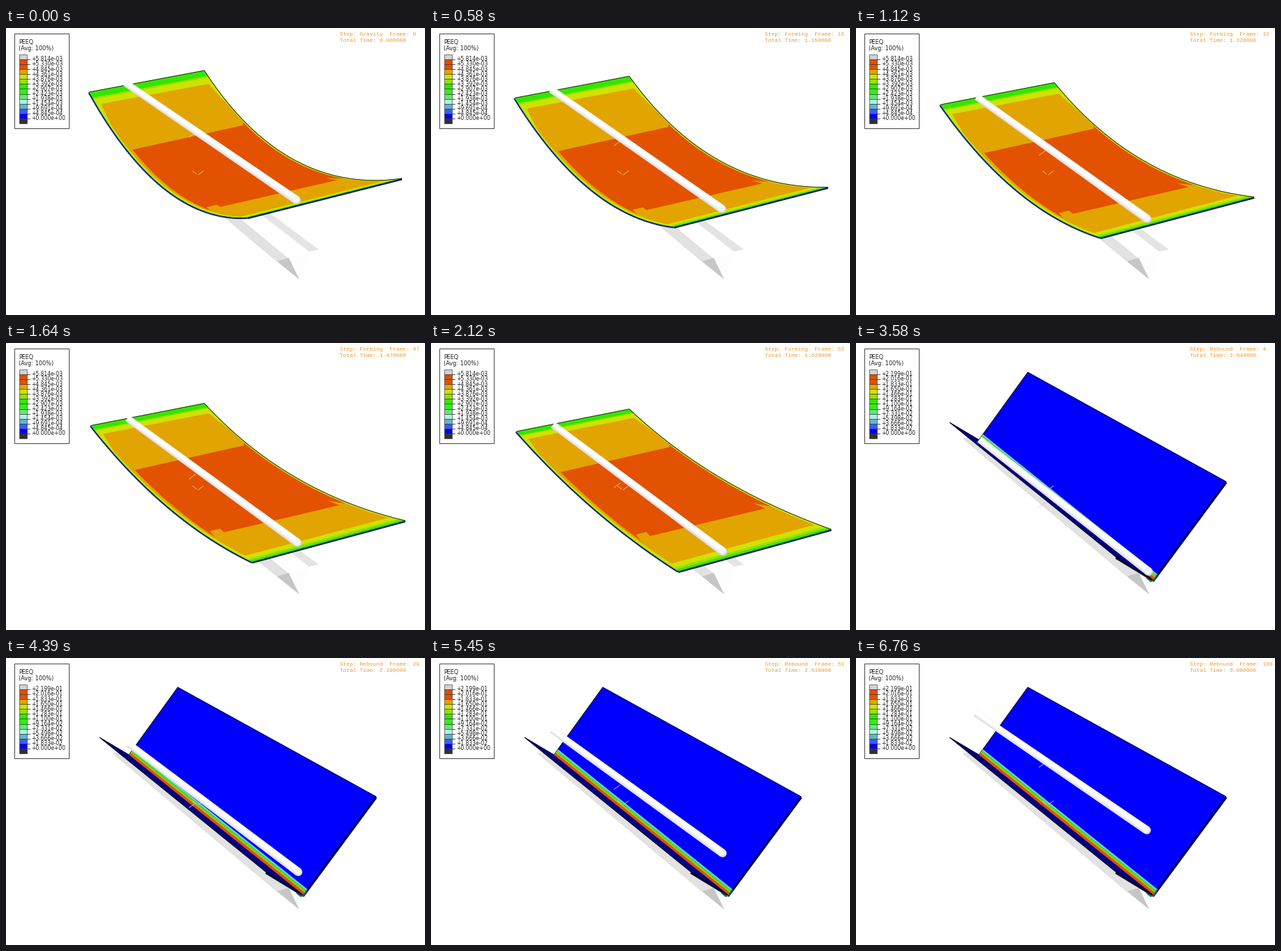
Animation of 600x412 px, one loop 6790 ms. Source, as a matplotlib script:

```python
import numpy as np
import matplotlib.pyplot as plt
from matplotlib.animation import FuncAnimation
from matplotlib.patches import Circle, Polygon, Rectangle

W, H, DPI = 600, 412, 100
PX = 72 / DPI
STEP_MS, COUNT = 35, 194
CONTACT = 83          # increment at which the fold starts
PEEQ_START = 0.00581445

# contour colours, lowest to highest
BINS = ["#0000ff", "#3c5cff", "#62b4cc", "#b0f0e0", "#62e878", "#30f014",
        "#34e600", "#98e000", "#cfe200", "#e2a400", "#e25200", "#dc5000"]

fig = plt.figure(figsize=(W / DPI, H / DPI), dpi=DPI, facecolor="white")
ax = fig.add_axes([0, 0, 1, 1])
ax.set_xlim(0, W)
ax.set_ylim(H, 0)
ax.axis("off")

moving = []


def poly(pts, color, z, edge="none", lw=0.0, keep=False):
    p = ax.add_patch(Polygon(pts, closed=True, facecolor=color, edgecolor=edge,
                             linewidth=lw * PX, zorder=z))
    if not keep:
        moving.append(p)


def line(pts, color, lw, z, style="-", alpha=1):
    pts = np.asarray(pts)
    moving.extend(ax.plot(pts[:, 0], pts[:, 1], color=color, lw=lw * PX, ls=style,
                          alpha=alpha, zorder=z, solid_capstyle="butt"))


def label(x, y, s, size, font, color="#202020"):
    return ax.text(x, y, s, fontsize=size * PX, family=font, color=color,
                   va="baseline", ha="left", zorder=20)


def shade(value, top, dim=1.0):
    n = min(int(value / top * 12), 11)
    rgb = [int(BINS[n][k:k + 2], 16) / 255 for k in (1, 3, 5)]
    return tuple(dim * c for c in rgb)


def unit(v):
    return v / np.hypot(*v)


# ---------- still parts ----------
def draw_die():
    poly([(405, 331), (434, 321), (420, 361)], "#fdfdfd", 1, keep=True)
    poly([(153, 137), (168, 136), (404, 331), (388, 335)], "#e2e2e2", 1,
         "#d2d2d2", 0.5, keep=True)
    poly([(388, 335), (405, 330), (420, 361)], "#c6c6c6", 1, keep=True)
    poly([(303, 219), (315, 219), (448, 318), (434, 321)], "#e4e4e4", 1, keep=True)


def draw_legend():
    ax.add_patch(Rectangle((11.5, 8), 78.5, 136, facecolor="white",
                           edgecolor="#484848", linewidth=PX, zorder=15))
    label(18, 23, "PEEQ", 8.2, "DejaVu Sans")
    label(18, 32, "(Avg: 100%)", 8.2, "DejaVu Sans")
    h = 7.07
    for k, c in enumerate(["#d2d2d2"] + BINS[::-1] + ["#303030"]):
        ax.add_patch(Rectangle((19, 38 + k * h), 11, h, facecolor=c,
                               edgecolor="#303030", linewidth=0.6 * PX, zorder=16))
    rows = []
    for k in range(13):
        y = 38 + (k + 1) * h
        ax.plot([30, 34], [y, y], color="#303030", lw=0.8 * PX, zorder=16)
        rows.append(label(36.3, y + 2.3, "", 7.6, "DejaVu Sans"))
    return rows


draw_die()
rows = draw_legend()
step_text = label(478.5, 10.8, "", 7.85, "Liberation Mono", "#f09a30")
time_text = label(478.5, 19.8, "", 7.85, "Liberation Mono", "#f09a30")


# ---------- sheet before the fold ----------
def edge_curve(p, q, bow):
    """Quadratic arc from p to q, its control point moved off the chord by bow."""
    p, q = np.array(p), np.array(q)
    c = (p + q) / 2 + np.array(bow)

    def at(a):
        a = np.asarray(a)[:, None]
        return (1 - a) ** 2 * p + 2 * a * (1 - a) * c + a ** 2 * q
    return at


def draw_curved(f):
    rest = max(1 - f / CONTACT, 0)
    left = edge_curve((119 + .05 * f, 92 + .565 * f),
                      (346 + .13 * f, 272 + .9 * f), (-10, 97 * rest ** 1.15))
    right = edge_curve((284, 61 + .545 * f),
                       (567 + .1 * f, 216 + .83 * f), (-26.5, 101 * rest))

    def surface(corners):
        """Outline through (along, across) corners mapped onto the sheet."""
        ab = []
        for p, q in zip(corners, corners[1:] + corners[:1]):
            ab.extend(np.linspace(p, q, 14, endpoint=False))
        ab = np.array(ab)
        b = ab[:, 1:]
        return (1 - b) * left(ab[:, 0]) + b * right(ab[:, 0])

    def band(a0, a1, b0, b1, value):
        poly(surface([(a0, b0), (a0, b1), (a1, b1), (a1, b0)]),
             shade(value, PEEQ_START), 3)

    s = np.linspace(0, 1, 40)
    rim_l, rim_r = left(s), right(s)
    front = np.array([rim_l[-1], rim_r[-1]])
    line(rim_l + (-.2, .6), "#0c1a60", 2.8, 2)
    line(front + (0, .8), "#0a1850", 3.2, 2)

    band(0, 1, 0, 1, .0031)
    band(.022, .985, .002, .998, .0036)
    band(.028, .97, .004, .996, .0041)
    poly(surface([(.05, .04), (.052, .965), (.15, .99), (.94, .98),
                  (.94, .025), (.15, .014)]), shade(.0046, PEEQ_START), 3)
    poly(surface([(.26, .04), (.253, .965), (.24, .984), (.75, .982), (.70, .93),
                  (.752, .935), (.74, .12), (.71, .13), (.71, .055),
                  (.755, .035)]), shade(.0050, PEEQ_START), 3)

    line(rim_l + (-.3, .6), "#2850f0", 1.3, 4, (0, (1.5, 1.5)), .3 + .5 * rest)
    line(front + (0, .6), "#1a40a0", 1.2, 4, (0, (1.5, 2)), .2 + .5 * rest)
    line([rim_l[0], rim_r[0]], "#202800", 1, 4)
    line(rim_r, "#201c08", .9, 4)


# ---------- sheet while folding ----------
def draw_folded(f, top):
    def at(*pts):
        pts = np.array(pts)
        keys = (CONTACT, 88, 100)
        return np.array([np.interp(f, keys, pts[:, k]) for k in (0, 1)])

    a = at((123, 139), (124, 133), (134, 114))
    b = at((357, 347), (357, 338), (372, 307))
    c = at((284, 107), (280, 88), (246, 42))
    d = at((575, 285), (570, 259), (530, 199))
    e0 = at((177, 129), (175, 133), (176, 139))
    e1 = at((423, 329), (424, 331), (426, 340))
    g = (f - CONTACT) / (100 - CONTACT)

    drop = np.array([0, 1.2])
    line([b + drop, e1 + drop, d + drop], "#060a38", 3.2, 2)
    poly([a, e0, e1, b], shade(.0046, top, 1 - .5 * g), 3, "#000018", 1)
    poly([e0, c, d, e1], shade(.0046, top), 3)
    line([e0, c, d], "#000020", 1, 4)
    line([d, e1], "#000030", 2, 4)

    ul, ur = unit(c - e0), unit(d - e1)
    widths = [(0, 3.2, 10), (3.2, 4.3, 9), (4.3, 5.6, 8), (5.6, 8, 5),
              (8, 9.2, 3), (9.2, 10, 2)]
    for lo, hi, n in widths:
        lo, hi = lo * g, hi * g
        poly([e0 + lo * ul, e0 + hi * ul, e1 + hi * ur, e1 + lo * ur], BINS[n], 4)
    # rounded nose of the bend
    nose = [e1 + 9 * g * ur, e1 + (1, 0), e1 + (-4 * g, 2 * g), e1 + (-10 * g, -3 * g)]
    line(nose, "#0a6a50", 2, 5)
    if g < .9:
        poly([e1 + (-5, -4), e1 + (2, -5), e1 + (3, -1), e1 + (-3, 0)], "#d85c10", 5)


# ---------- punch ----------
def draw_punch(u):
    p0 = np.array([171 + 6 * u, 79 + 62 * u])
    p1 = np.array([416.5 + 3 * u, 247.3 + 84.5 * u])
    along = unit(p1 - p0)
    n = np.array([along[1], -along[0]])
    r0, r1 = 4.8, 5.8
    moving.append(ax.add_patch(Circle(p1, r1, color="#d2d2d2", lw=0, zorder=8)))
    moving.append(ax.add_patch(Circle(p1 - (.6, 1), r1 - 1, color="#f4f4f4",
                                      lw=0, zorder=9)))
    strips = [(-1, 1, "#ffffff"), (-1, -.72, "#d8d8d8"), (-.72, -.4, "#eaeaea"),
              (-.4, -.1, "#f7f7f7"), (.85, 1, "#f2f2f2")]
    for lo, hi, color in strips:
        poly([p0 + lo * r0 * n, p0 + hi * r0 * n, p1 + hi * r1 * n, p1 + lo * r1 * n],
             color, 8)


def draw_marks(u, color):
    y = 154 + 82 * u
    line([(262, y + 3), (271, y - 4)], color, .8, 6)
    line([(267, 205), (273, 210)], color, .8, 6)
    line([(275, 211), (283, 205)], color, .8, 6)


def state(k):
    """Step name, increment and total time on show in tick k."""
    slot = (k * STEP_MS + 30) * 33 // 1000
    i = slot - (slot + 6) // 11
    if i < 2:
        return "Gravity", i, float(i)
    if i < 103:
        return "Forming", i - 2, 1 + (i - 2) / 100
    return "Rebound", i - 103, 2 + (i - 103) / 100


def update(k):
    while moving:
        moving.pop().remove()
    name, inc, total = state(k)
    f = {"Gravity": 0, "Forming": inc, "Rebound": 100}[name]
    u = 1 - inc / 100 if name == "Rebound" else f / 100
    top = np.interp(f, (CONTACT, 88, 100), (PEEQ_START, .07632, .219936))

    if f <= CONTACT:
        draw_curved(f)
        draw_marks(u, "#ecc470")
    else:
        draw_folded(f, top)
        if name == "Rebound":
            draw_marks(u, "#c8c8ff")
    draw_punch(u)

    for n, row in enumerate(rows):
        row.set_text(f"{top * (12 - n) / 12:+.3e}")
    step_text.set_text(f"Step: {name}  Frame: {inc}")
    time_text.set_text(f"Total Time: {total:.6f}")
    return []


anim = FuncAnimation(fig, update, frames=COUNT, interval=STEP_MS,
                     repeat=True, repeat_delay=0, blit=False)
plt.show()
```
